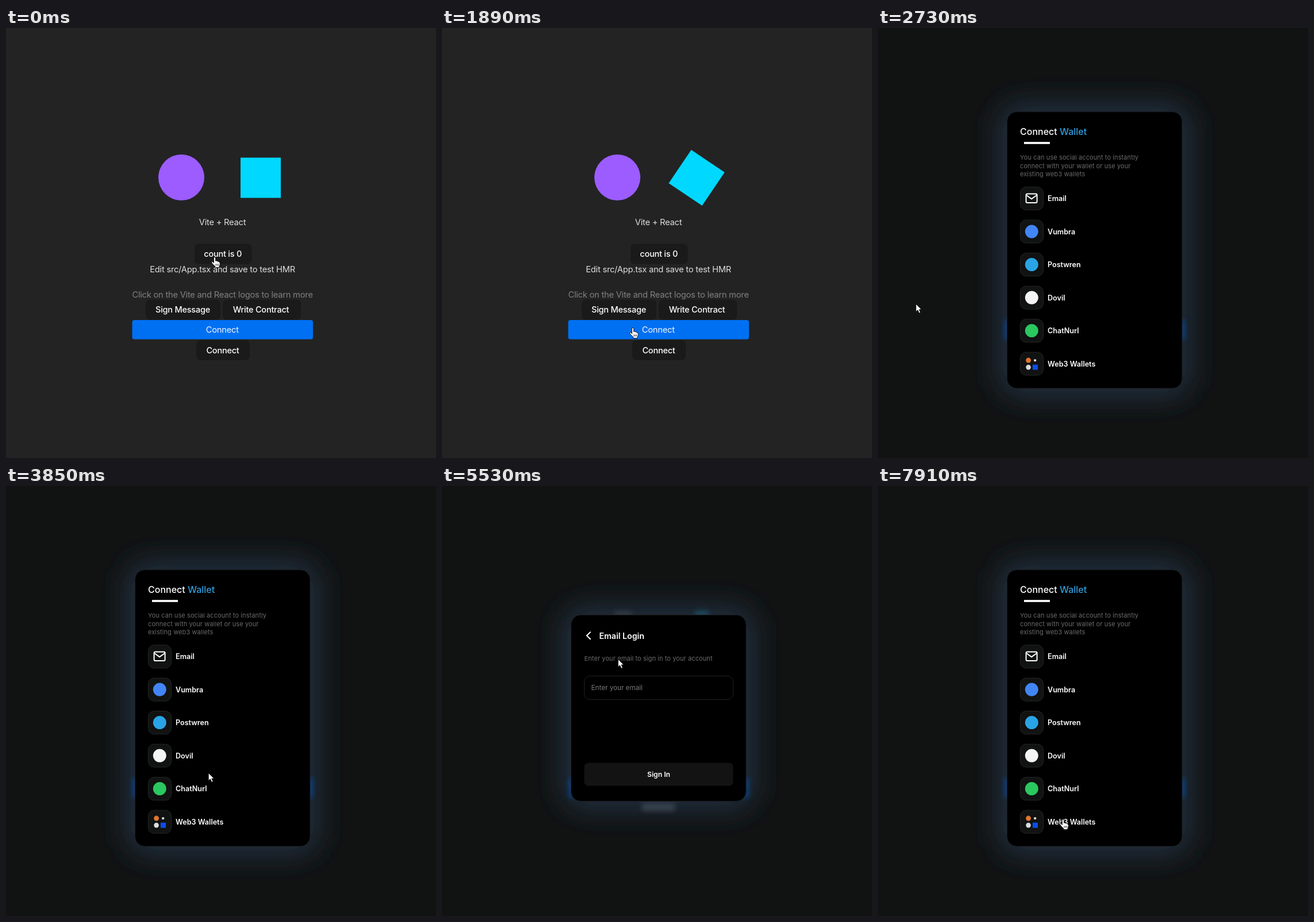
Animation of 748x748 px, one loop 8 s. Source, as an HTML page:

```html
<!DOCTYPE html>
<html lang="en">
<head>
<meta charset="utf-8">
<title>Connect Wallet</title>
<style>
  html, body { margin: 0; width: 100%; height: 100%; overflow: hidden; background: #232323; }
  svg { display: block; width: 100vw; height: 100vh; font-family: Inter, "Open Sans", sans-serif; cursor: default; }
  .page { font-size: 14.7px; letter-spacing: -.23px; text-anchor: middle; fill: #dedede; }
  .btn { font-size: 14.5px; font-weight: 500; fill: #fff; }
  .main { fill: #f4f8ff; }
  .hint { fill: #808080; }
  .note { font-size: 11px; letter-spacing: .1px; fill: #6a6a6a; }
  .label { font-size: 12.6px; font-weight: 600; fill: #fff; }
  .line { fill: none; stroke: #fff; stroke-width: 2; stroke-linecap: round; stroke-linejoin: round; }
</style>
</head>
<body>
<svg viewBox="0 0 748 748">
  <defs>
    <filter id="soft" filterUnits="userSpaceOnUse" x="60" y="0" width="630" height="748"><feGaussianBlur stdDeviation="26"/></filter>
    <filter id="smudge" filterUnits="userSpaceOnUse" x="180" y="180" width="400" height="420"><feGaussianBlur stdDeviation="4"/></filter>
    <clipPath id="clip"><rect id="clipBox" x="224.5" width="304.5" rx="17"/></clipPath>
  </defs>
  <rect width="748" height="748" fill="#232323"/>
  <g class="page" id="page">
    <circle cx="305" cy="260" r="40" fill="#9c5cff"/>
    <rect id="spinner" x="408" y="225.5" width="70" height="70" fill="#00d8ff"/>
  </g>
  <g id="overlay">
    <rect width="748" height="748" fill="#111212"/>
    <rect id="glow" x="211" width="331.5" rx="34" fill="#243143" filter="url(#soft)"/>
    <g filter="url(#smudge)">
      <rect x="220" y="508" width="314" height="34" fill="#0a4fb0" opacity=".6"/>
      <rect x="300" y="217" width="30" height="60" fill="#8a8a94" opacity=".18"/>
      <rect x="440" y="216" width="24" height="60" fill="#1aa0c8" opacity=".25"/>
      <rect x="348" y="552" width="57" height="13" fill="#8fa0b4" opacity=".25"/>
    </g>
    <g id="modal">
      <rect id="card" x="224.5" width="304.5" rx="17" fill="#000" stroke="#1d1f21"/>
      <g clip-path="url(#clip)">
        <g id="list">
          <text x="247" y="185.6" font-size="16" font-weight="500" fill="#fff">Connect <tspan fill="#2f9fe0">Wallet</tspan></text>
          <rect x="254" y="198.2" width="45" height="3.6" fill="#fff"/>
          <g class="note">
            <text x="247" y="228.5">You can use social account to instantly</text>
            <text x="247" y="243.5">connect with your wallet or use your</text>
            <text x="247" y="258.3">existing web3 wallets</text>
          </g>
        </g>
        <g id="login">
          <path class="line" d="M258 254.2L251.8 260.2L258 266.2"/>
          <text x="273.5" y="266.2" font-size="14.2" font-weight="600" fill="#fff">Email Login</text>
          <text class="note" x="247.5" y="303.6">Enter your email to sign in to your account</text>
          <rect x="247.5" y="330.5" width="259" height="41" rx="10" fill="#000" stroke="#222"/>
          <text x="259.5" y="355.3" font-size="11.7" fill="#777">Enter your email</text>
          <rect x="247.5" y="481.5" width="259" height="40" rx="7" fill="#131313"/>
          <text x="377" y="506" font-size="12.1" font-weight="600" fill="#fff" text-anchor="middle">Sign In</text>
        </g>
      </g>
    </g>
  </g>
  <g id="cursor" stroke="#000" stroke-width=".9" stroke-linejoin="round">
    <path id="arrow" fill="#fff" d="M0 0V13.6L3.2 10.7L5.6 16.2L8 15.1L5.7 9.8H9.8Z"/>
    <g id="hand">
      <path fill="#fff" d="M-1.6 9.6V1a1.6 1.6 0 0 1 3.2 0V6.3l1-.5 1.8.4.6.7 1.6.2.7.8 1.6.5c.8 3 .3 5-.9 7v2.2H.6v-2.2C-1.8 13.5-4.4 11-5.4 8.8c-.4-1.4 1.4-1.9 2.3-.9z"/>
      <path fill="none" stroke-width=".8" d="M2 11.2v3.4M4.2 11.2v3.4M6.4 11.2v3.4"/>
    </g>
  </g>
</svg>
<script>
const LOOP = 8000;
const MID = 386.3, LIST_H = 481, LOGIN_H = 324, SLIDE = 300, SPREAD = 13.5;
const OPEN = 2170, TO_LOGIN = 4130, TO_LIST = 6075;
const el = id => document.getElementById(id);

function add(parent, tag, attrs, text) {
  const node = document.createElementNS('http://www.w3.org/2000/svg', tag);
  for (const key in attrs) node.setAttribute(key, attrs[key]);
  if (text) node.textContent = text;
  parent.append(node);
  return node;
}
const set = (id, attrs) => { for (const key in attrs) el(id).setAttribute(key, attrs[key]); };

// Landing page
const buttons = [
  { x: 328, y: 375.5, w: 99.5, h: 35, text: 'count is 0' },
  { x: 243, y: 472.5, w: 130, h: 35, text: 'Sign Message' },
  { x: 377, y: 472.5, w: 136, h: 35, text: 'Write Contract' },
  { x: 219.5, y: 508, w: 314.5, h: 33.5, text: 'Connect', main: true },
  { x: 331, y: 543, w: 93, h: 35, text: 'Connect' }
];
add(el('page'), 'text', { x: 376.6, y: 342.6 }, 'Vite + React');
for (const b of buttons) {
  add(el('page'), 'rect', { x: b.x, y: b.y, width: b.w, height: b.h, rx: b.main ? 4 : 7, fill: b.main ? '#0070f3' : '#1a1a1a' });
  const mid = b.x + b.w / 2 - (b.w > 130 && !b.main ? 1.5 : 0.5);
  add(el('page'), 'text', { x: mid, y: b.y + b.h / 2 + 5.3, class: b.main ? 'main' : 'btn' }, b.text);
}
add(el('page'), 'text', { x: 376.6, y: 424.6 }, 'Edit src/App.tsx and save to test HMR');
add(el('page'), 'text', { x: 376.6, y: 469.2, class: 'hint' }, 'Click on the Vite and React logos to learn more');

// Sign-in choices
const rowY = i => 296.6 + 57.5 * i;
const choices = [
  ['Email'], ['Vumbra', '#4285f4'], ['Postwren', '#29a4e6'],
  ['Dovil', '#f4f4f4'], ['ChatNurl', '#2bc75f'], ['Web3 Wallets']
];
choices.forEach(([name, color], i) => {
  const y = rowY(i), list = el('list');
  add(list, 'rect', { x: 247.5, y: y - 20, width: 40, height: 40, rx: 10, fill: '#111212', stroke: '#242626' });
  if (color) add(list, 'circle', { cx: 267.3, cy: y, r: 11.5, fill: color });
  add(list, 'text', { x: 295, y: y + 4.6, class: 'label' }, name);
});
add(el('list'), 'rect', { x: 257.6, y: 288.6, width: 19, height: 15.4, rx: 2, class: 'line' });
add(el('list'), 'path', { d: 'M258 290.8L267.1 297.4L276.2 290.8', class: 'line' });
const last = rowY(5);
add(el('list'), 'circle', { cx: 261.6, cy: last - 6, r: 4.5, fill: '#e0752d' });
add(el('list'), 'circle', { cx: 273.2, cy: last - 6, r: 2.2, fill: '#ddd' });
add(el('list'), 'circle', { cx: 261.6, cy: last + 6, r: 4.3, fill: '#ddd' });
add(el('list'), 'rect', { x: 269, y: last + 1.5, width: 9, height: 9, fill: '#0b4df0' });

// Pointer path: time, x, y
const path = [
  [0, 363, 399], [70, 363, 399], [600, 386, 545], [840, 385, 534], [1300, 366, 555],
  [1890, 332, 522], [2190, 331, 522], [2730, 66, 480], [2870, 37, 478], [3010, 37, 478],
  [3780, 383, 569], [3990, 267, 306], [4130, 267, 306], [4410, 346, 307], [5000, 374, 348],
  [5740, 290, 290], [6000, 252, 262], [6100, 252, 262], [6440, 250, 266], [7420, 259, 178],
  [7910, 322, 580], [LOOP, 322, 580]
];

const clamp = v => Math.max(0, Math.min(1, v));
const easeOut = (t, start, span) => 1 - (1 - clamp((t - start) / span)) ** 3;
const mix = (a, b, k) => a + (b - a) * k;

function pointer(t) {
  const i = path.findIndex(p => p[0] > t), a = path[i - 1], b = path[i];
  const k = (t - a[0]) / (b[0] - a[0]), s = k * k * (3 - 2 * k);
  return [mix(a[1], b[1], s), mix(a[2], b[2], s)];
}

function overTarget(t, x, y) {
  if (t < OPEN) return buttons.some(b => x > b.x && x < b.x + b.w && y > b.y && y < b.y + b.h);
  if (t > TO_LOGIN && t < TO_LIST) return x > 246 && x < 262 && Math.abs(y - 260) < 9;
  return x > 247 && x < 507 && choices.some((c, i) => Math.abs(y - rowY(i)) < 20.5);
}

function view(id, shift, stretch, alpha) {
  set(id, { transform: `translate(${shift} ${MID}) scale(1 ${stretch}) translate(0 ${-MID})`, opacity: alpha });
}

function draw(t) {
  set('spinner', { transform: `rotate(${t * 0.018} 443 260.5)` });

  const open = easeOut(t, OPEN, 430);
  const zoom = mix(0.95, 1, open);
  set('overlay', { opacity: open, visibility: open ? 'visible' : 'hidden' });
  set('modal', { transform: `translate(377 ${MID}) scale(${zoom}) translate(-377 ${-MID})` });

  const back = t >= TO_LIST;
  const p = back ? easeOut(t, TO_LIST, 500) : easeOut(t, TO_LOGIN, 500);
  const login = back ? 1 - p : p;
  const h = mix(LIST_H, LOGIN_H, login);
  for (const id of ['card', 'clipBox']) set(id, { y: MID - h / 2, height: h });
  set('glow', { y: MID - h / 2 - SPREAD, height: h + 2 * SPREAD });

  const leave = clamp(1 - p * 1.6);
  view('list', -SLIDE * login, h / LIST_H, back ? p : leave);
  view('login', SLIDE * (1 - login), h / LOGIN_H, back ? leave : p);

  const [x, y] = pointer(t), over = overTarget(t, x, y);
  set('cursor', { transform: `translate(${x} ${y})` });
  set('hand', { visibility: over ? 'visible' : 'hidden' });
  set('arrow', { visibility: over ? 'hidden' : 'visible' });
}

const begin = performance.now();
function tick() {
  draw((performance.now() - begin) % LOOP);
  requestAnimationFrame(tick);
}
tick();
</script>
</body>
</html>
```
